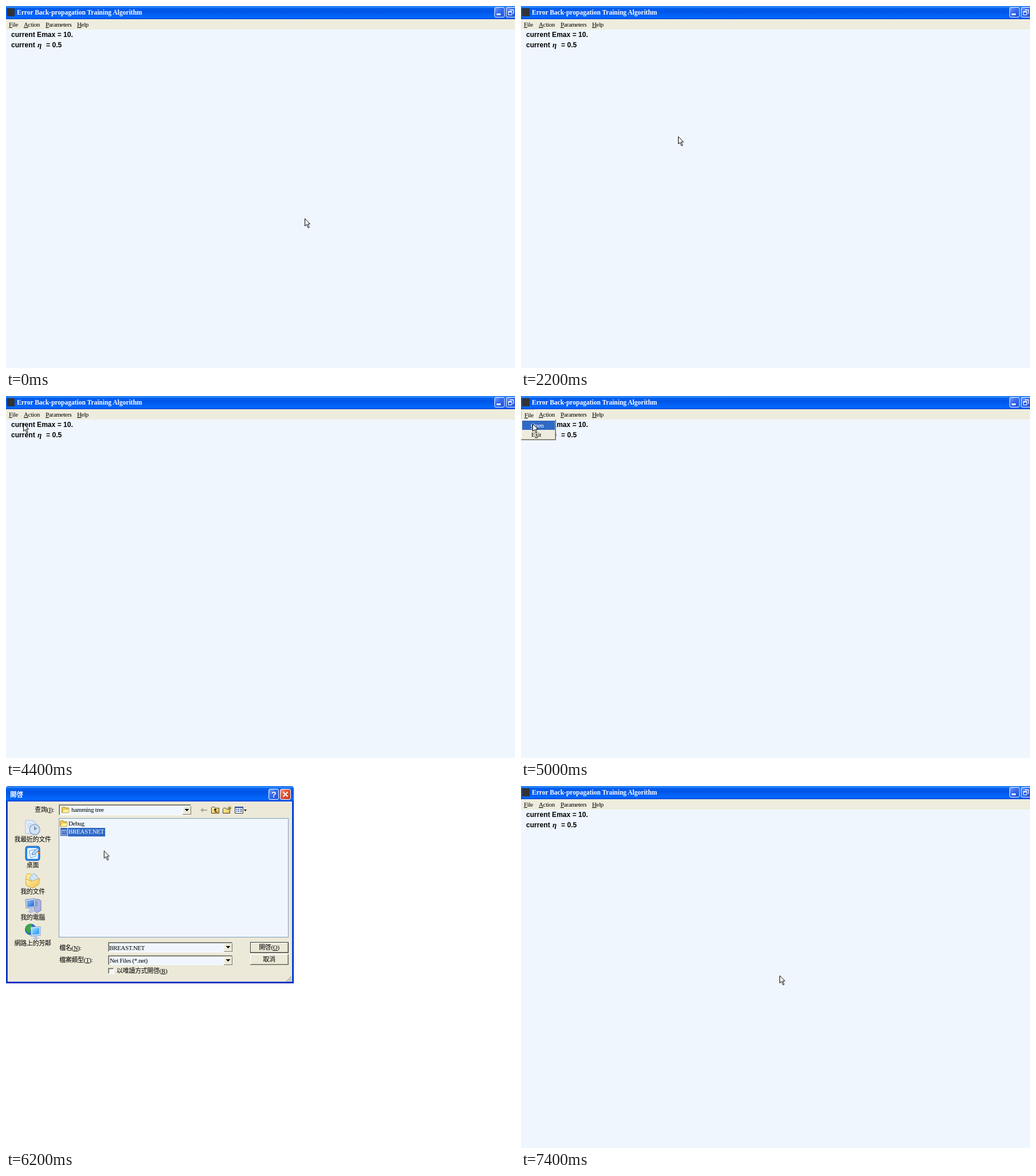
An HTML page that plays this animation: 888 px wide and 631 px high, repeating every 8 s.

```html
<!DOCTYPE html>
<html lang="zh-Hant">
<head>
<meta charset="utf-8">
<title>Error Back-propagation Training Algorithm</title>
<style>
html, body { margin: 0; width: 100%; height: 100%; overflow: hidden; background: #fff; }
svg { display: block; }
text { font: 11px "Liberation Serif", "Noto Sans CJK TC", "Noto Sans CJK JP", serif; letter-spacing: -.35px; white-space: pre; }
.u { text-decoration: underline; }
.title { font-weight: bold; font-size: 11.5px; letter-spacing: 0; fill: #fff; }
.out { font: bold 12px "Liberation Sans", Arial, sans-serif; letter-spacing: .05px; }
.eta { font: italic bold 13px "Liberation Serif", serif; }
.mid { text-anchor: middle; }
.w { fill: #fff; }
.crisp { shape-rendering: crispEdges; }

#cursor { animation: move 8s infinite steps(1); }
.menu, .closed, .open, .dialog, .idle, .picked, .hover { animation: 8s infinite steps(1); }
.hover { animation-name: hover; }
.menu { animation-name: menu; }
.closed { animation-name: closed; }
.open { animation-name: open; }
.dialog { animation-name: dialog; }
.idle { animation-name: idle; }
.picked { animation-name: picked; }

/* the pointer is sampled every 200 ms */
@keyframes move {
  0% { transform: translate(521px, 370px); animation-timing-function: steps(3); }
  7.5% { transform: translate(493px, 354px); animation-timing-function: steps(3); }
  15% { transform: translate(434px, 318px); animation-timing-function: steps(5); }
  27.5% { transform: translate(274px, 227px); }
  30% { transform: translate(256px, 215px); animation-timing-function: steps(5); }
  42.5% { transform: translate(132px, 131px); }
  45% { transform: translate(98px, 107px); animation-timing-function: steps(5); }
  57.5% { transform: translate(13px, 33px); }
  60% { transform: translate(14px, 35px); }
  62.5% { transform: translate(20px, 48px); }
  65% { transform: translate(16px, 5px); animation-timing-function: steps(4); }
  75% { transform: translate(115px, 78px); animation-timing-function: steps(6); }
  90% { transform: translate(449px, 285px); }
  92.5%, 100% { transform: translate(451px, 330px); }
}
@keyframes hover { 0%, 60% { opacity: 0; } 57.5% { opacity: 1; } 100% { opacity: 0; } }
@keyframes menu { 0%, 65%, 100% { opacity: 0; } 60% { opacity: 1; } }
@keyframes closed { 0%, 65%, 100% { opacity: 1; } 60% { opacity: 0; } }
@keyframes open { 0%, 65%, 100% { opacity: 0; } 62.5% { opacity: 1; } }
@keyframes dialog { 0%, 92.5%, 100% { opacity: 0; } 65% { opacity: 1; } }
@keyframes idle { 0%, 100% { opacity: 1; } 75% { opacity: 0; } }
@keyframes picked { 0%, 92.5%, 100% { opacity: 0; } 75% { opacity: 1; } }
</style>
</head>
<body>
<svg width="888" height="631" viewBox="0 0 888 631">
  <defs>
    <linearGradient id="bar" x2="0" y2="1">
      <stop stop-color="#1a6fe8"/><stop offset=".07" stop-color="#3a93ff"/>
      <stop offset=".16" stop-color="#0560ee"/><stop offset=".4" stop-color="#0054e6"/>
      <stop offset=".84" stop-color="#0368ff"/><stop offset=".92" stop-color="#005cf5"/>
      <stop offset="1" stop-color="#003fc8"/>
    </linearGradient>
    <linearGradient id="blueBtn" x2="1" y2="1">
      <stop stop-color="#7da4f8"/><stop offset=".4" stop-color="#3a6df0"/><stop offset="1" stop-color="#1c50d8"/>
    </linearGradient>
    <linearGradient id="redBtn" x2="1" y2="1">
      <stop stop-color="#f2a088"/><stop offset=".4" stop-color="#e2593a"/><stop offset="1" stop-color="#c43a18"/>
    </linearGradient>
    <linearGradient id="yellow" x2="1" y2="1">
      <stop stop-color="#fff6b0"/><stop offset="1" stop-color="#f0bd45"/>
    </linearGradient>
    <linearGradient id="screen" x2="1" y2="1">
      <stop stop-color="#8fc6fa"/><stop offset="1" stop-color="#1c62d0"/>
    </linearGradient>
    <linearGradient id="cyan" x2="1" y2="1">
      <stop stop-color="#9be4ff"/><stop offset="1" stop-color="#1f8ef0"/>
    </linearGradient>
    <g id="folder">
      <path d="M.5 10.500V1.500l1-1h4l1 1.500h5.500v8.500z" fill="#f2cc58" stroke="#b58a25"/>
      <path d="M1 10.500l2-6h10.500l-1.800 6z" fill="#fff0a0" stroke="#c29a38" stroke-width=".7"/>
    </g>
    <g id="drop" class="crisp">
      <path d="M0 0h14v14H0z" fill="#ece9d8"/>
      <path d="M0 14V0h14" fill="none" stroke="#fff"/>
      <path d="M0 14h14V0" fill="none" stroke="#77756a"/>
      <path d="M3 5h8l-4 4z"/>
    </g>
  </defs>

  <g id="main">
    <rect width="888" height="631" fill="#eff6fe"/>
    <rect width="888" height="23" fill="url(#bar)"/>
    <rect y="23" width="888" height="18" fill="#eeecdd"/>
    <rect x="2" y="4" width="13" height="14" fill="#333"/>
    <text class="title" x="19" y="15">Error Back-propagation Training Algorithm</text>
    <g fill="url(#blueBtn)" stroke="#e8f0ff">
      <rect x="852.500" y="2.500" width="17" height="17" rx="2.500"/>
      <rect x="872.500" y="2.500" width="17" height="17" rx="2.500"/>
    </g>
    <path class="w" d="M856 13h7v3h-7z"/>
    <path d="M879.500 8V6.500h6V13H884M876.500 9.500h6v6h-6zM876 10.500h7M879 7h7" fill="none" stroke="#fff"/>

    <text class="closed" x="5" y="36"><tspan class="u">F</tspan>ile</text>
    <text x="31" y="36"><tspan class="u">A</tspan>ction</text>
    <text x="69" y="36"><tspan class="u">P</tspan>arameters</text>
    <text x="124" y="36"><tspan class="u">H</tspan>elp</text>
    <text class="out" x="9" y="54">current Emax = 10.</text>
    <text class="out" x="9" y="72">current</text>
    <text class="eta" x="55" y="72">η</text>
    <text class="out" x="70" y="72">= 0.5</text>

    <g class="hover crisp" fill="none">
      <path d="M.5 40V23.500H24" stroke="#fff"/><path d="M.5 40.500h24V23" stroke="#aca899"/>
    </g>
    <g class="menu">
      <g class="crisp" fill="none">
        <path d="M.5 40V23.500H24" stroke="#c8c5b5"/><path d="M24.500 24v16" stroke="#fff"/>
        <path d="M0 41h61v36H0z" fill="#eeecdd"/>
        <path d="M.5 76V41.500H60" stroke="#fff"/>
        <path d="M0 76.500h60.500V41" stroke="#6b695f"/>
        <path d="M1 75.500h58.500V42" stroke="#aca899"/>
      </g>
      <text x="6" y="37"><tspan class="u">F</tspan>ile</text>
      <text x="17" y="55"><tspan class="u">O</tspan>pen</text>
      <text x="18" y="71">E<tspan class="u">x</tspan>it</text>
      <g class="open">
        <path class="crisp" d="M2 43h57v16H2z" fill="#316ac5"/>
        <text class="w" x="17" y="55"><tspan class="u">O</tspan>pen</text>
      </g>
    </g>
  </g>

  <g class="dialog">
    <rect width="888" height="631" class="w"/>
    <path d="M0 344V5q0-5 5-5h492q5 0 5 5v339z" fill="#0a48d8"/>
    <path d="M0 27V5q0-5 5-5h492q5 0 5 5v22z" fill="url(#bar)"/>
    <path class="crisp" d="M3 27h496v314H3z" fill="#ece9d8"/>
    <path class="crisp" d="M.5 27v316.500h501V27" fill="none" stroke="#0a22b0"/>
    <path class="crisp" d="M1 342.500h500" stroke="#0a34c8"/>
    <text class="title" x="7" y="19">開啓</text>
    <g stroke="#fff">
      <rect x="458.500" y="5.500" width="17" height="18" rx="2.500" fill="url(#blueBtn)"/>
      <rect x="478.500" y="5.500" width="18" height="18" rx="2.500" fill="url(#redBtn)"/>
      <path d="M483.500 10.500l8 8m0-8l-8 8" stroke-width="2"/>
    </g>
    <text x="467" y="20" class="w mid" style="font:bold 14px 'Liberation Sans',sans-serif">?</text>

    <text x="50" y="45">查詢(<tspan class="u">I</tspan>):</text>
    <g class="crisp" fill="#eff6fe">
      <path d="M92 32h231v19H92zM178 272h217v18H178zM178 295h217v17H178zM178 317h10v10h-10z"/>
      <path d="M92.500 56.500h400v207h-400z" stroke="#7f9db9"/>
      <g fill="none">
        <path d="M92.500 51V32.500H323M178.500 289V272.500H395M178.500 312V295.500H395M178.500 327V317.500H188" stroke="#9a988c"/>
        <path d="M93.500 50V33.500H322M179.500 288V273.500H394M179.500 311V296.500H394M179.500 326V318.500H187" stroke="#65635a"/>
        <path d="M93 50.500h229.500V33M179 289.500h215.500V273M179 311.500h215.500V296M179 327.500h9.500V318" stroke="#fff"/>
      </g>
    </g>
    <use href="#drop" x="308" y="35"/>
    <use href="#drop" x="380" y="274"/>
    <use href="#drop" x="380" y="297"/>
    <use href="#folder" x="97" y="36"/>
    <text x="114" y="45">hamming tree</text>

    <path d="M339 42l5-4v3h7v2h-7v3z" fill="#aca899"/>
    <g stroke="#333" stroke-width=".9" fill="url(#yellow)">
      <path d="M358.500 47.500v-10l1-1h4l1.500 2h6.500v9z"/>
      <path d="M378.500 47.500v-8l1-1h4l1.500 2h5.500v7z"/>
    </g>
    <path d="M363 42l2-2 2 2m-2-1.500v4.500h4" fill="none" stroke="#000" stroke-width="1.200"/>
    <path d="M390 35v7m-3.500-3.500h7m-6-2.500l5 5m0-5l-5 5" stroke="#8a7410"/>
    <path d="M399.500 36.500h14v11h-14z" fill="#fff" stroke="#333"/>
    <path d="M400 37.500h13" stroke="#2a5bc8" stroke-width="2"/>
    <path d="M401 41h2m1 0h3m1 0h4m-11 3h2m1 0h3m1 0h4" stroke="#30509a" stroke-width="1.500"/>
    <path d="M415 41h5l-2.500 3z"/>

    <use href="#folder" x="94" y="60"/>
    <text x="109" y="69">Debug</text>
    <path class="crisp" d="M95.500 73.500h11v13h-11z" fill="#fff" stroke="#555"/>
    <path d="M96 75h10" stroke="#3060c8" stroke-width="2"/>
    <path d="M98 79h3v2h-3zm4 0h3v2h-3zm-4 3h7v2h-7z" fill="#345aa8"/>
    <text x="109" y="83">BREAST.NET</text>

    <g transform="translate(33 59)">
      <path d="M1 1h14l5 5v18H1z" fill="#e2eeff" stroke="#a9bfe2"/>
      <path d="M15 1v5h5M4 7h9M4 10h9M4 13h6" fill="none" stroke="#b4caec"/>
      <circle cx="17" cy="17" r="9" fill="#d3e4f6" stroke="#8ba6c8" stroke-width="1.500"/>
      <path d="M17 11v6l4-3" fill="none" stroke="#4d6488" stroke-width="1.200"/>
    </g>
    <g transform="translate(33 104)">
      <rect x="1" y="1" width="25" height="25" rx="4" fill="#2b86e6" stroke="#1a5fb4"/>
      <rect x="4" y="4" width="19" height="19" rx="2" fill="#e6f3ff"/>
      <path d="M8 9l10-2 1 11-9 3z" fill="#fff" stroke="#5da2e8"/>
      <path d="M12 16l1-4 9-8 3 3-9 9z" fill="#b9d8f8" stroke="#3a7cc8"/>
      <path d="M22 9l5 3-4 3z" fill="#d9733a"/>
    </g>
    <g transform="translate(33 150)">
      <path d="M2 22V7l2-4h6l3 3h8v17z" fill="url(#yellow)" stroke="#d0aa50"/>
      <path d="M8 10l8-8 8 9-9 9z" fill="#cfe5fb" stroke="#86b4e4"/>
      <path d="M1 12l10 4 15-5-2 11-10 6-11-4z" fill="url(#yellow)" stroke="#d0aa50"/>
    </g>
    <g transform="translate(33 195)">
      <path d="M16 4l7-2 5 3v17l-7 4-5-3z" fill="#a9b4dc" stroke="#7482b8"/>
      <path d="M18 8l4-1M18 11l4-1M18 14l4-1" stroke="#5f6fae"/>
      <path d="M1 3l17-2v15L2 18z" fill="#cdd9f2" stroke="#7d91c4"/>
      <path d="M3 5l13-1.500v11L4 16z" fill="url(#screen)"/>
      <path d="M7 18l6-1 1 4 5 2-8 4-7-3 4-2z" fill="#b9c4e2"/>
    </g>
    <g transform="translate(33 239)">
      <circle cx="10" cy="11" r="10" fill="#2166c8"/>
      <path d="M1 8q4-8 12-7l-1 5 3 4-6 3-1 6q-7-4-7-11z" fill="#3fa83c"/>
      <path d="M10 7l17-1v15l-16 2z" fill="#d5e4f8" stroke="#7d9fd0"/>
      <path d="M12 9l13-1v11l-12 1.500z" fill="url(#cyan)"/>
      <path d="M16 23l5-1 1 3 4 1-7 3-8-2 5-1z" fill="#b9c8e2"/>
    </g>
    <g class="mid">
      <text x="46.500" y="97">我最近的文件</text>
      <text x="46.500" y="142">桌面</text>
      <text x="46.500" y="188">我的文件</text>
      <text x="46.500" y="233">我的電腦</text>
      <text x="46.500" y="278">網路上的芳鄰</text>
    </g>

    <text x="93" y="286">檔名(<tspan class="u">N</tspan>):</text>
    <text x="93" y="307">檔案類型(<tspan class="u">T</tspan>):</text>
    <text x="181" y="308">Net Files (*.net)</text>
    <text x="193" y="326">以唯讀方式開啓(<tspan class="u">R</tspan>)</text>
    <path class="idle crisp" d="M181.500 276v11" stroke="#000"/>

    <g class="crisp" fill="none">
      <path d="M427 290V273.500h64M426.500 311V293.500H492" stroke="#fff"/>
      <path d="M427 289.500h64.500V274M427 310.500h64.500V294" stroke="#aca899"/>
      <path d="M426.500 272.500h66v18h-66z" stroke="#333"/>
      <path d="M426 311.500h66.500V293" stroke="#66645a"/>
    </g>
    <text class="mid" x="459" y="285">開啓(<tspan class="u">O</tspan>)</text>
    <text class="mid" x="459" y="306">取消</text>
    <path d="M489 341l9-9m-5 9l5-5m-1 5l1-1" stroke="#aca899" stroke-width="1.500"/>

    <g class="picked">
      <path class="crisp" d="M95 73h12v14H95z" fill="#316ac5" opacity=".6"/>
      <path class="crisp" d="M108 73h65v15h-65z" fill="#316ac5"/>
      <text class="w" x="109" y="83">BREAST.NET</text>
      <text x="180" y="286">BREAST.NET</text>
    </g>
  </g>

  <g id="cursor">
    <path d="M.5.700V13.500l3-2.800 2.600 6 2-.9-2.600-5.800h4z" fill="#fff" stroke="#000"/>
  </g>
</svg>
</body>
</html>
```
